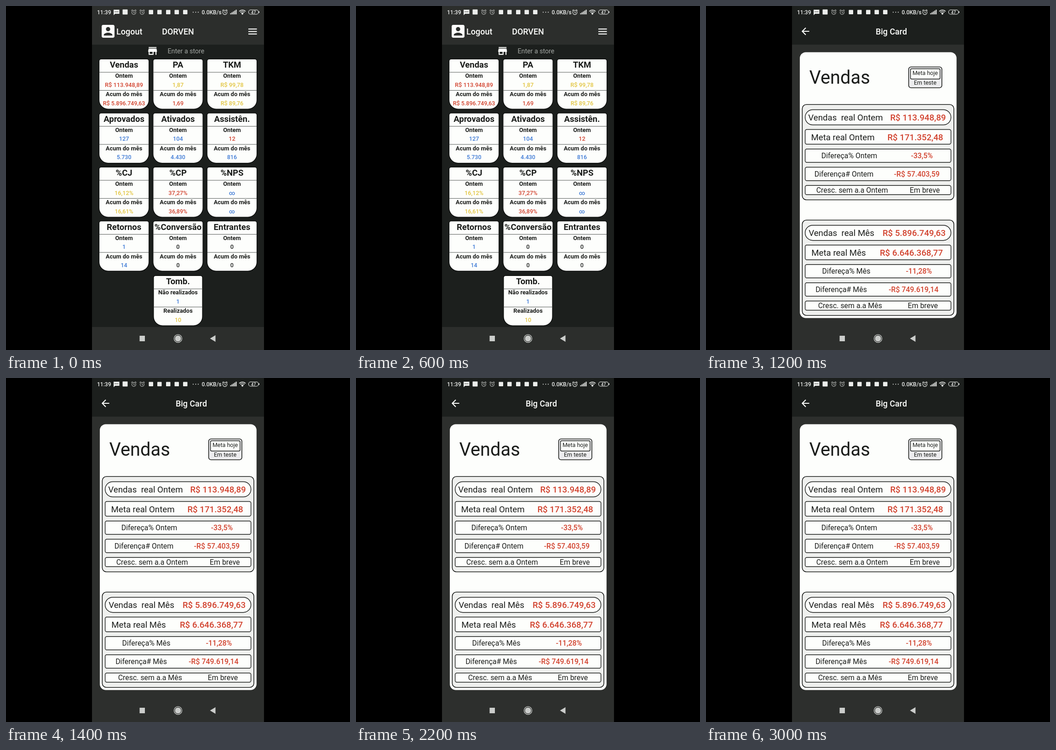
These frames come from a looping animation (748 px wide and 748 px high, 3.2 s). An HTML page:

```html
<!DOCTYPE html>
<html lang="pt-BR">
<head>
<meta charset="utf-8">
<title>Painel de vendas</title>
<style>
  html, body { margin: 0; width: 100%; height: 100%; overflow: hidden; background: #000; }
  svg { display: block; width: 748px; height: 748px; font-family: Roboto, sans-serif; }
  .mid { text-anchor: middle; }
  .home, .detail, .touch, .ripple { animation: 3.2s step-end infinite; }
  .home { animation-name: home; }
  .detail { animation-name: detail; }
  .touch { animation-name: touch; }
  .ripple { animation-name: ripple; }
  @keyframes home { 0% { opacity: 1 } 37.5%, 100% { opacity: 0 } }
  @keyframes detail { 0% { opacity: 0 } 37.5%, 100% { opacity: 1 } }
  @keyframes touch { 0% { opacity: 0 } 31.25% { opacity: 1 } 37.5%, 100% { opacity: 0 } }
  @keyframes ripple { 0% { opacity: 0 } 81.25% { opacity: 1 } 87.5% { opacity: .4 } 93.75%, 100% { opacity: 0 } }
</style>
</head>
<body>
<svg id="stage" viewBox="0 0 748 748"></svg>
<script>
const INK = '#1b1d1b', PAPER = '#fdfefc', RED = '#d2432f', BLUE = '#3f7bd6', GOLD = '#e2c540';

const rect = (x, y, w, h, fill, r = 0, extra = '') =>
  `<rect x="${x}" y="${y}" width="${w}" height="${h}" rx="${r}" fill="${fill}" ${extra}/>`;
const text = (s, x, y, size, weight = 400, fill = INK, cls = 'mid') =>
  `<text class="${cls}" x="${x}" y="${y}" font-size="${size}" font-weight="${weight}" fill="${fill}">${s}</text>`;
const path = (d, fill, extra = '') => `<path d="${d}" fill="${fill}" ${extra}/>`;
const group = (cls, ...parts) => `<g class="${cls}">${parts.join('')}</g>`;
const outlined = (x, y, w, h, r, fill, line = 1.4) =>
  rect(x, y, w, h, fill, r, `stroke="${INK}" stroke-width="${line}"`);

// Status bar
const alarm = (x, r, c) => `<g fill="none" stroke="${c}" stroke-width="1.2">
  <circle cx="${x}" cy="14" r="${r}"/>
  <path d="M${x} 11.4V14.3l2 1.2M${x - 5.5} 10.2l2.8-2.4M${x + 5.5} 10.2l-2.8-2.4"/></g>`;

function statusBar() {
  const c = '#eceeec';
  const squares = [310.5, 329, 348, 366.5, 385].map(x => rect(x, 8.5, 9.5, 9.5, c, 1));
  const dots = [407, 412.5, 418].map(x => `<circle cx="${x}" cy="13.5" r="1" fill="${c}"/>`);
  const bars = [0, 1, 2, 3, 4].map(i =>
    rect(487.5 + i * 3, 15.6 - i * 1.9, 2, 2.6 + i * 1.9, c));
  const waves = [3, 6, 9].map(r => {
    const d = r * .76;
    return `M${514 - d} ${18.5 - d}A${r + 1} ${r + 1} 0 0 1 ${514 + d} ${18.5 - d}`;
  }).join('');
  return group('status',
    text('11:39', 198, 17.8, 12, 500, c, ''),
    path('M234 8h12.5v9H237l-3 3z', c),
    [236.5, 239.4, 242.3].map(x => rect(x, 11.7, 1.6, 1.6, '#2b2d2b')).join(''),
    rect(253.5, 7.5, 11, 11, c, 1),
    alarm(278, 4.3, '#b4b6b4'), alarm(296, 4.3, '#b4b6b4'),
    ...squares, ...dots,
    text('0.0KB/s', 425.5, 17.8, 12, 500, c, ''),
    alarm(476, 4.6, c), ...bars,
    path(waves, 'none', `stroke="${c}" stroke-width="1.7"`),
    `<circle cx="514" cy="17.2" r="1.5" fill="${c}"/>`,
    rect(527.5, 8.5, 21.5, 9.5, 'none', 4.5, `stroke="${c}" stroke-width="1.1"`),
    rect(549.5, 11.5, 1.5, 3.5, c),
    text('47', 538.2, 16.5, 9, 500, c));
}

function navBar() {
  const c = '#cbcdcb';
  return group('nav',
    rect(290.5, 717, 11.5, 12, c),
    `<circle cx="374" cy="723" r="8.6" fill="none" stroke="${c}" stroke-width="1.3"/>`,
    `<circle cx="374" cy="723" r="6.6" fill="${c}"/>`,
    path('M443.5 723l12-7.2v14.4z', c));
}

// Home screen: title, two values with their colours
const cards = [
  ['Vendas', 'R$ 113.948,89', RED, 'R$ 5.896.749,63', RED],
  ['PA', '1,87', GOLD, '1,69', RED],
  ['TKM', 'R$ 99,78', GOLD, 'R$ 89,76', GOLD],
  ['Aprovados', '127', BLUE, '5.730', BLUE],
  ['Ativados', '104', BLUE, '4.430', BLUE],
  ['Assistên.', '12', RED, '816', BLUE],
  ['%CJ', '16,12%', GOLD, '16,61%', GOLD],
  ['%CP', '37,27%', RED, '36,89%', RED],
  ['%NPS', '∞', BLUE, '∞', BLUE],
  ['Retornos', '1', BLUE, '14', BLUE],
  ['%Conversão', '0', INK, '0', INK],
  ['Entrantes', '0', INK, '0', INK],
];

function card([title, a, colorA, b, colorB], cx, y, labelA = 'Ontem', labelB = 'Acum do mês', w = 107) {
  const x = cx - w / 2;
  const shape = `M${x} ${y + 4}q0-4 4-4h${w - 8}q4 0 4 4v84a19 19 0 0 1-19 19.5h${38 - w}a19 19 0 0 1-19-19.5z`;
  return path(shape, PAPER, 'stroke="#0c0e0d" stroke-width="3" paint-order="stroke"') +
    rect(x, y + 27.6, w, 1, '#555a58') + rect(x, y + 67, w, 1, '#555a58') +
    text(title, cx, y + 18.4, 18.5, 700) +
    text(labelA, cx, y + 40.3, 12.8, 700) +
    text(a, cx, y + 60, 12.8, 500, colorA, 'mid') +
    text(labelB, cx, y + 80.4, 12.9, 700) +
    text(b, cx, y + 100, 12.5, 500, colorB, 'mid');
}

function home() {
  const bar = '#2c2e2c';
  const grid = cards.map((c, i) =>
    card(c, 256.6 + (i % 3) * 117.4, 116 + Math.floor(i / 3) * 117.45));
  return group('home',
    rect(187, 0, 374, 748, '#1c1f1d'),
    rect(187, 0, 374, 84, bar), rect(187, 698, 374, 50, bar),
    path('M3 5v14c0 1.1.89 2 2 2h14c1.1 0 2-.9 2-2V5c0-1.1-.9-2-2-2H5c-1.11 0-2 .9-2 2zm12 4c0 1.66-1.34 3-3 3s-3-1.34-3-3 1.34-3 3-3 3 1.34 3 3zm-9 8c0-2 4-3.1 6-3.1s6 1.1 6 3.1v1H6v-1z',
      PAPER, 'transform="translate(203.4 36.4) scale(1.55)"'),
    text('Logout', 240, 61.6, 18, 500, PAPER, ''),
    text('DORVEN', 374, 61.6, 17.9, 500, PAPER),
    [49, 54.4, 59.8].map(y => rect(527, y, 18.5, 2.1, PAPER)).join(''),
    path('M20 4H4v2h16V4zm1 10v-2l-1-5H4l-1 5v2h1v6h10v-6h4v6h2v-6h1zm-9 4H6v-4h6v4z',
      PAPER, 'transform="translate(306 85) scale(1.06)"'),
    text('Enter a store', 351.5, 103, 14.2, 400, '#a4a7a4', ''),
    ...grid,
    card(['Tomb.', '1', BLUE, '10', GOLD], 374, 587, 'Não realizados', 'Realizados', 105),
    touch());
}

function touch() {
  const ring = (r, w, dash, o) =>
    `<circle cx="233" cy="161" r="${r}" fill="none" stroke="#2e2a2a" stroke-width="${w}"
      stroke-dasharray="${dash}" opacity="${o}" style="filter:blur(1.2px)"/>`;
  return group('touch',
    ring(31.5, 5, '9 4 3 5', .4), ring(35, 3, '4 7 2 9', .3),
    '<circle cx="233" cy="161" r="30" fill="#a8443d" opacity=".8"/>');
}

// Detail screen: row top, height, corner, baseline, size, value weight
const rows = [
  [225.5, 33, 16.5, 248.6, 18.7, 500],
  [268.5, 32, 3.5, 291.6, 18.7, 500],
  [311, 29, 3.5, 331, 15.9, 500],
  [350.5, 29.3, 3.5, 370.6, 15.9, 500],
  [390.3, 20, 3.5, 405.8, 15.9, 400],
];
// label, label centre, value, value centre
const day = [
  ['Vendas\u00a0 real Ontem', 303.5, 'R$ 113.948,89', 461],
  ['Meta real Ontem', 297.5, 'R$ 171.352,48', 455],
  ['Difereça% Ontem', 311.5, '-33,5%', 469.5],
  ['Diferença# Ontem', 300, '-R$ 57.403,59', 458.5],
  ['Cresc. sem a.a Ontem', 317.7, 'Em breve', 475.7],
];
const month = [
  ['Vendas\u00a0 real Mês', 294.5, 'R$ 5.896.749,63', 452.5],
  ['Meta real Mês', 288.5, 'R$ 6.646.368,77', 446.5],
  ['Difereça% Mês', 305, '-11,28%', 463],
  ['Diferença# Mês', 294, '-R$ 749.619,14', 451.5],
  ['Cresc. sem a.a Mês', 313.3, 'Em breve', 471.5],
];

function panel(data, dy) {
  const lines = data.map(([label, lx, value, vx], i) => {
    const [y, h, r, base, size, weight] = rows[i];
    return outlined(215.6, y, 317, h, r, PAPER) +
      text(label, lx, base, size) +
      text(value, vx, base, size, weight, weight > 400 ? RED : INK);
  });
  return `<g transform="translate(0 ${dy})">${outlined(209.3, 214.3, 329.7, 207.2, 9, '#eff0ee', 1.6)}${lines.join('')}</g>`;
}

function detail() {
  return group('detail',
    rect(187, 0, 374, 748, '#2d2f2d'), rect(187, 0, 374, 84, '#1c1f1d'),
    path('M20 11H7.83l5.59-5.59L12 4l-8 8 8 8 1.41-1.41L7.83 13H20v-2z',
      PAPER, 'transform="translate(203.7 42.6) scale(1.04)"'),
    text('Big Card', 403, 61.6, 17.9, 500, PAPER),
    rect(204, 100.5, 340.8, 578, PAPER, 13),
    text('Vendas', 224.5, 169, 39.8, 400, INK, ''),
    outlined(440.7, 132.5, 72.2, 45.2, 5, '#ececee', 1.6),
    outlined(444.7, 136.5, 64.2, 22.3, 2.5, PAPER),
    text('Meta hoje', 476.5, 150.2, 12.5),
    text('Em teste', 476.5, 170.8, 12.5),
    panel(day, 0), panel(month, 251.2),
    group('ripple', rect(413, 698, 76, 50, '#434543', 25)));
}

document.getElementById('stage').innerHTML = home() + detail() + statusBar() + navBar();
</script>
</body>
</html>
```
